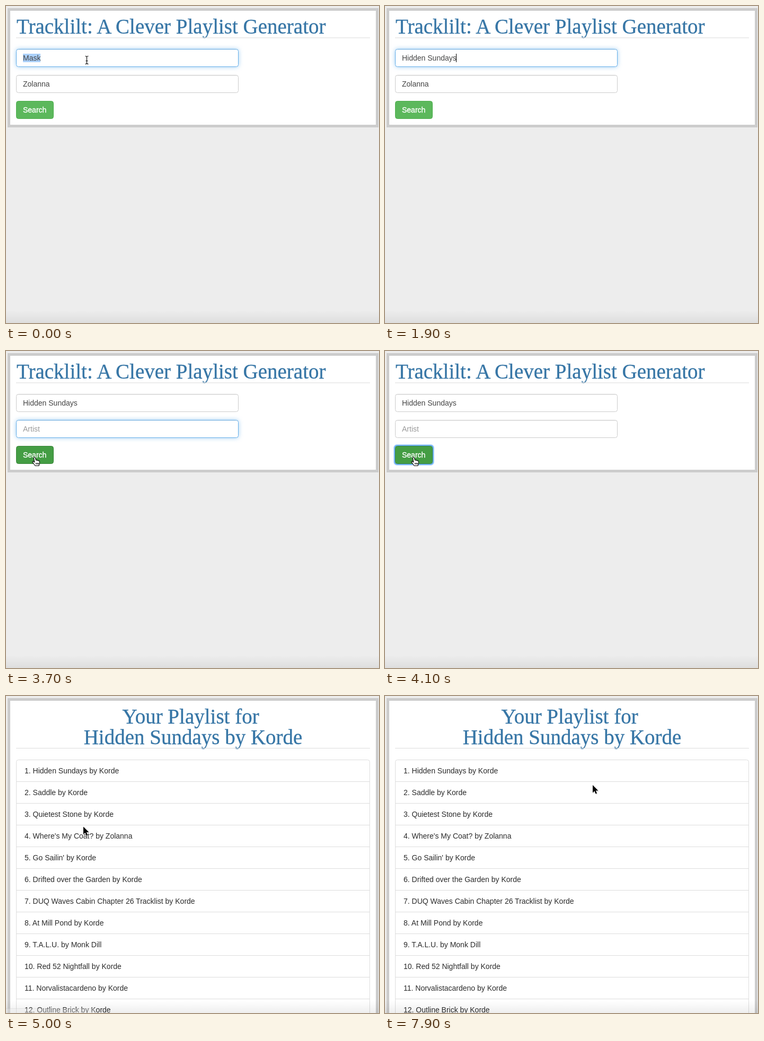
Animation of 704 by 598 pixels, one loop 8 s. Source, as an HTML page:

```html
<!DOCTYPE html>
<html lang="en">
<head>
<meta charset="utf-8">
<title>Playlist generator</title>
<style>
html, body { margin: 0; width: 100%; height: 100%; overflow: hidden; background: #ededed; }
svg { display: block; width: 704px; height: 598px; }
text { font: 14px "Liberation Sans", Arial, sans-serif; fill: #444; white-space: pre; }
.h { font: 39px "Liberation Serif", Georgia, serif; fill: #3776a6; stroke: #3776a6; stroke-width: .35; }
.mid { text-anchor: middle; }
.input { fill: #fff; stroke: #ccc; }
.input.on { stroke: #66afe9; filter: drop-shadow(0 0 4px rgba(102, 175, 233, .6)); }
.btn { fill: #5cb85c; stroke: #4cae4c; }
.btn.hover { fill: #449d44; stroke: #398439; }
.label { fill: #fff; stroke: #fff; stroke-width: .35; }
.row { fill: #2b2b2b; }
.sel { fill: #abd0fa; }
</style>
</head>
<body>
<svg viewBox="0 0 704 598">
  <defs>
    <linearGradient id="fade" x2="0" y2="1">
      <stop stop-color="#000" stop-opacity="0"/>
      <stop offset="1" stop-color="#000" stop-opacity=".065"/>
    </linearGradient>
  </defs>
  <rect width="704" height="598" fill="#ededed"/>

  <g id="form">
    <rect x="5.5" y="6.5" width="695" height="220" fill="#fff" stroke="#ccc" stroke-width="5"/>
    <text class="h" x="20" y="52">Tracklilt: A Clever Playlist Generator</text>
    <path d="M19 60H687" stroke="#e6e6e6" stroke-width="1.5"/>
    <rect id="box1" class="input" x="19.5" y="81.5" width="419" height="33" rx="4"/>
    <rect id="box2" class="input" x="19.5" y="130.5" width="419" height="33" rx="4"/>
    <path d="M22 82.5H436M22 131.5H436" stroke="#000" stroke-opacity=".06"/>
    <rect id="sel1" class="sel" x="32" y="90" width="33" height="16"/>
    <rect id="sel2" class="sel" x="32" y="139" width="52" height="16"/>
    <text id="song" x="32" y="103"></text>
    <text id="artist" x="32" y="152"></text>
    <path id="caret" stroke="#000"/>
    <g id="ring" fill="none" stroke="#5ea8f4">
      <rect x="17.5" y="177.5" width="74" height="37" rx="5" stroke-width="3" opacity=".45"/>
      <rect x="18.5" y="178.5" width="72" height="35" rx="4" stroke-width="2"/>
    </g>
    <rect id="btn" class="btn" x="19.5" y="179.5" width="70" height="33" rx="4"/>
    <text class="label" x="32" y="201">Search</text>
  </g>

  <g id="list">
    <rect x="5.5" y="6.5" width="695" height="620" fill="#fff" stroke="#ccc" stroke-width="5"/>
    <text class="h mid" x="348.5" y="52">Your Playlist for</text>
    <text class="h mid" x="353" y="91">Hidden Sundays by Korde</text>
    <path d="M19 98.5H687" stroke="#ddd"/>
    <rect x="19.5" y="120.5" width="667" height="520" rx="4" fill="#fff" stroke="#ddd"/>
    <g id="rows"></g>
  </g>

  <rect y="574" width="704" height="24" fill="url(#fade)"/>
  <path id="status" d="M-1 600V589.5H165.500Q168.500 589.500 168.500 592.500V600" fill="#ececec" stroke="#c4c4c4"/>

  <g id="arrow">
    <path d="M.8 1.500V16L4 13L6.200 18L9 17L6.800 12H11.500Z" fill="#000" opacity=".18"/>
    <path d="M0 0V14.500L3.400 11.300L5.600 16.400L8 15.400L5.800 10.400H10.400Z" stroke="#fff" stroke-width="1" paint-order="stroke"/>
  </g>
  <g id="beam" fill="none">
    <path d="M-3-7.500Q0-7.500 0-5.500Q0-7.500 3-7.500M0-5.500V5.500M-3 7.500Q0 7.500 0 5.500Q0 7.500 3 7.500M-2 1.500H2" stroke="#fff" stroke-width="3"/>
    <path d="M-3-7.500Q0-7.500 0-5.500Q0-7.500 3-7.500M0-5.500V5.500M-3 7.500Q0 7.500 0 5.500Q0 7.500 3 7.500M-2 1.500H2" stroke="#111" stroke-width="1.200"/>
  </g>
  <path id="hand" d="M-1.700 1.200Q-.2-.8 1.200 1.200L2.600 6Q4.200 5 5 6.400Q6.800 5.600 7.400 7.200Q9.300 6.800 9.400 9L9 13L8 16.500H1.200L-1.500 13L-4 9.600Q-4.200 7.800-2.200 8.200L-.2 9.800ZM2.800 11V14M5 11V14M7 11V14" fill="#fff" stroke="#000" stroke-width="1.100" stroke-linejoin="round"/>
</svg>
<script>
const LOOP = 8000, STEP = 100;
const SONG = "Hidden Sundays";
const TYPE_START = 400, TYPE_GAP = 105;
const FOCUS2 = 2200, CLEAR = 2500, POINTER_BACK = 2600, CLICK = 4000, RESULT = 5000;

const songs = [
  SONG + " by Korde", "Saddle by Korde", "Quietest Stone by Korde",
  "Where's My Coat? by Zolanna", "Go Sailin' by Korde",
  "Drifted over the Garden by Korde", "DUQ Waves Cabin Chapter 26 Tracklist by Korde",
  "At Mill Pond by Korde", "T.A.L.U. by Monk Dill", "Red 52 Nightfall by Korde",
  "Norvalistacardeno by Korde", "Outline Brick by Korde"
];

// pointer keys: time, x, y
const path = [
  [0, 152.5, 102], [POINTER_BACK, 152.5, 102], [3000, 60, 197], [3300, 60, 197],
  [3700, 54, 200], [4100, 54, 200], [4600, 146, 246.5], [5900, 146, 246.5],
  [6400, 190, 214], [6800, 243, 187], [7000, 260, 182.5], [7700, 392, 168]
];

const el = id => document.getElementById(id);
const show = (id, on) => { el(id).style.display = on ? "" : "none"; };
const clamp = v => Math.max(0, Math.min(1, v));

el("rows").innerHTML = songs.map((name, i) => {
  const y = 146 + 41 * i;
  const line = i ? `<path d="M20 ${y - 25.5}H686" stroke="#ddd"/>` : "";
  return `${line}<text class="row" x="35" y="${y}">${i + 1}. ${name}</text>`;
}).join("");

function pointerAt(t) {
  const i = path.findIndex(k => k[0] > t);
  if (i < 0) return path[path.length - 1].slice(1);
  const [a, b] = [path[i - 1], path[i]];
  const u = (t - a[0]) / (b[0] - a[0]);
  return [a[1] + (b[1] - a[1]) * u, a[2] + (b[2] - a[2]) * u];
}

function pointerKind(t, x, y) {
  if (t >= TYPE_START && t < POINTER_BACK) return "";
  if (t >= RESULT) return "arrow";
  if (x > 19 && x < 90 && y > 179 && y < 213) return "hand";
  const inField = x > 19 && x < 439 && (y > 81 && y < 115 || y > 130 && y < 164);
  return inField ? "beam" : "arrow";
}

function drawForm(t, kind) {
  const typed = t < TYPE_START ? 0 : Math.floor((t - TYPE_START) / TYPE_GAP) + 1;
  const song = el("song"), artist = el("artist");
  song.textContent = typed ? SONG.slice(0, typed) : "Mask";
  artist.textContent = t < CLEAR ? "Zolanna" : "Artist";
  artist.style.fill = t < CLEAR ? "" : "#999";
  show("sel1", !typed);
  show("sel2", t >= FOCUS2 && t < CLEAR);
  el("box1").classList.toggle("on", t < FOCUS2);
  el("box2").classList.toggle("on", t >= FOCUS2 && t < CLICK);
  show("caret", typed && t < 2100);
  const cx = Math.floor(32 + song.getComputedTextLength()) + .5;
  el("caret").setAttribute("d", `M${cx} 90V106`);
  el("btn").classList.toggle("hover", kind === "hand" || t >= CLICK);
  show("ring", t >= CLICK);
}

function draw(now) {
  const t = Math.floor(now % LOOP / STEP) * STEP;
  const [x, y] = pointerAt(t);
  const kind = pointerKind(t, x, y);
  show("form", t < RESULT);
  show("list", t >= RESULT);
  if (t < RESULT) drawForm(t, kind);
  for (const id of ["arrow", "beam", "hand"]) {
    show(id, id === kind);
    el(id).setAttribute("transform", `translate(${x} ${y})`);
  }
  el("status").style.opacity = t < RESULT
    ? clamp((t - 4200) / 300)
    : clamp((5200 - t) / 200) * .35;
}

let start;
function tick(now) {
  start ??= now;
  draw(now - start);
  requestAnimationFrame(tick);
}
draw(0);
requestAnimationFrame(tick);
</script>
</body>
</html>
```
